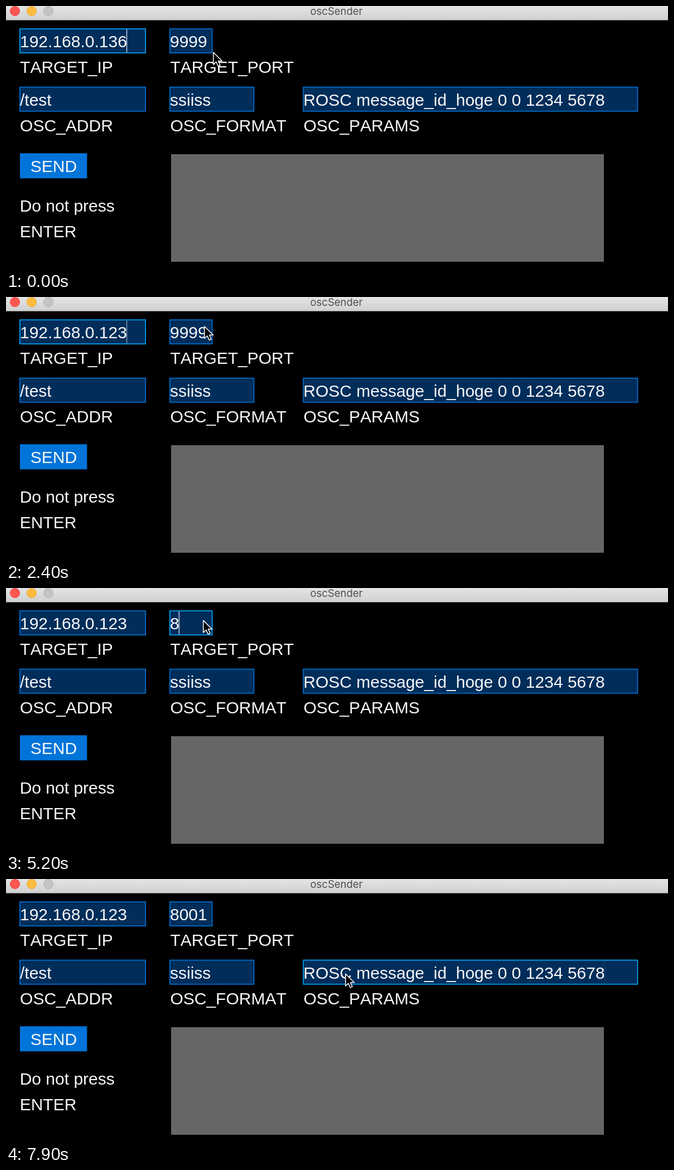
Animation, 1187 px wide and 472 px high, one loop 8 s. Source, as an HTML page:

```html
<!DOCTYPE html>
<html lang="en">
<head>
<meta charset="utf-8">
<title>oscSender</title>
<style>
  html, body { margin: 0; width: 100%; height: 100%; overflow: hidden; background: #000; }
  svg { display: block; width: 100vw; height: 100vh; }
  text { font: 30px "Liberation Sans", Arial, sans-serif; font-kerning: none; fill: #f8f8f8; white-space: pre; }
  .title { font: 18.5px Inter, sans-serif; fill: #505050; text-anchor: middle; }
</style>
</head>
<body>
<svg id="stage" viewBox="0 0 1187 472">
  <defs>
    <linearGradient id="bar" x2="0" y2="1">
      <stop offset="0" stop-color="#e4e4e4"/>
      <stop offset="1" stop-color="#d0d0d0"/>
    </linearGradient>
  </defs>
  <rect width="1187" height="472"/>
  <rect width="1187" height="25.5" fill="url(#bar)"/>
  <g stroke-width="1">
    <circle cx="16" cy="9" r="8.6" fill="#fc5753" stroke="#e9504c"/>
    <circle cx="46" cy="9" r="8.6" fill="#fdbc40" stroke="#e8aa3a"/>
    <circle cx="76" cy="9" r="8.6" fill="#c4c4c2" stroke="#b4b4b2"/>
  </g>
  <text class="title" x="592.5" y="16.4">oscSender</text>
  <rect x="25" y="264.3" width="120.3" height="45" fill="#0074d9"/>
  <rect x="296" y="266" width="776" height="193" fill="#666668"/>
  <g id="labels"></g>
  <g id="fields"></g>
  <rect id="caret" width="1.4" height="41" fill="#eef"/>
  <path id="cursor" d="M.8 1.8V23.5L5.8 18.8 9.4 26.4 13 24.8 9.6 17.2H16.5Z"
        fill="#000" stroke="#fff" stroke-width="1.5" stroke-linejoin="round"/>
</svg>
<script>
const LOOP = 8000, STEP = 100, SIZE = 30;
const byId = id => document.getElementById(id);

function add(parent, tag, attrs, text = '') {
  const node = document.createElementNS('http://www.w3.org/2000/svg', tag);
  for (const key in attrs) node.setAttribute(key, attrs[key]);
  node.textContent = text;
  return parent.appendChild(node);
}

for (const [x, y, text] of [
  [25.1, 120, 'TARGET_IP'], [294.4, 120, 'TARGET_PORT'],
  [25.1, 225, 'OSC_ADDR'], [294.4, 225, 'OSC_FORMAT'], [533.4, 225, 'OSC_PARAMS'],
  [43.8, 298, 'SEND'], [24.7, 369, 'Do not press'], [24.7, 415, 'ENTER']
]) add(byId('labels'), 'text', { x, y }, text);

function makeField(x, y, width, value) {
  const box = add(byId('fields'), 'rect', {
    x: x + .8, y: y + .8, width: width - 1.6, height: 43.2,
    fill: '#002d5a', 'stroke-width': 1.6
  });
  const label = add(byId('fields'), 'text', { x: x + 1, y: y + 34 }, value);
  return { x, y, box, label };
}

const ip = makeField(24, 40.2, 227, '192.168.0.136');
const addr = makeField(24, 144.8, 227, '/test');
const port = makeField(293, 40.2, 77.5, '9999');
const format = makeField(293, 144.8, 152.3, 'ssiiss');
const params = makeField(532.3, 144.8, 601, 'ROSC message_id_hoge 0 0 1234 5678');
const fields = [ip, addr, port, format, params];

// [time, value] edits, [time, field] focus changes, [time, x, y] pointer stops
const ipEdits = [[0, '192.168.0.136'], [700, '192.168.0.13'], [900, '192.168.0.1'],
  [1500, '192.168.0.12'], [1700, '192.168.0.123']];
const portEdits = [[0, '9999'], [4000, '999'], [4300, '99'], [4600, '9'], [4800, ''],
  [5100, '8'], [5300, '80'], [5500, '800'], [5700, '8001']];
const focus = [[0, ip], [2800, port], [7600, params]];
const path = [[0, 371, 81.5], [500, 471, -6], [1800, 471, -6], [2400, 355, 51],
  [2700, 353, 56.5], [6400, 353, 56.5], [7000, 639, 153], [7500, 608, 168.5], [8000, 608, 168.5]];

const latest = (list, t) => list.filter(item => item[0] <= t).pop()[1];
const ease = p => p * p * (3 - 2 * p);

function pointerAt(t) {
  const i = path.findIndex(stop => stop[0] > t);
  const [t0, x0, y0] = path[i - 1], [t1, x1, y1] = path[i];
  const p = ease((t - t0) / (t1 - t0));
  return [x0 + (x1 - x0) * p, y0 + (y1 - y0) * p];
}

function textWidth(text) {
  const widths = { ' ': .278, '.': .278, R: .722, O: .778, S: .667, C: .722,
    m: .833, s: .5, i: .222 };
  return [...text].reduce((sum, ch) => sum + (widths[ch] || .556), 0) * SIZE;
}

function draw(t) {
  const active = latest(focus, t);
  ip.label.textContent = latest(ipEdits, t);
  port.label.textContent = latest(portEdits, t);
  for (const f of fields) f.box.setAttribute('stroke', f === active ? '#00aaff' : '#0074d9');

  const caret = byId('caret');
  caret.setAttribute('x', active.x + textWidth(active.label.textContent));
  caret.setAttribute('y', active.y + 2);
  caret.setAttribute('opacity', .9 * Math.abs(Math.sin(t * .003 + 1.53)));
  byId('cursor').setAttribute('transform', `translate(${pointerAt(t)})`);
}

function tick() {
  const t = performance.now() % LOOP;
  draw(Math.floor(t / STEP) * STEP);
  requestAnimationFrame(tick);
}
tick();
</script>
</body>
</html>
```
